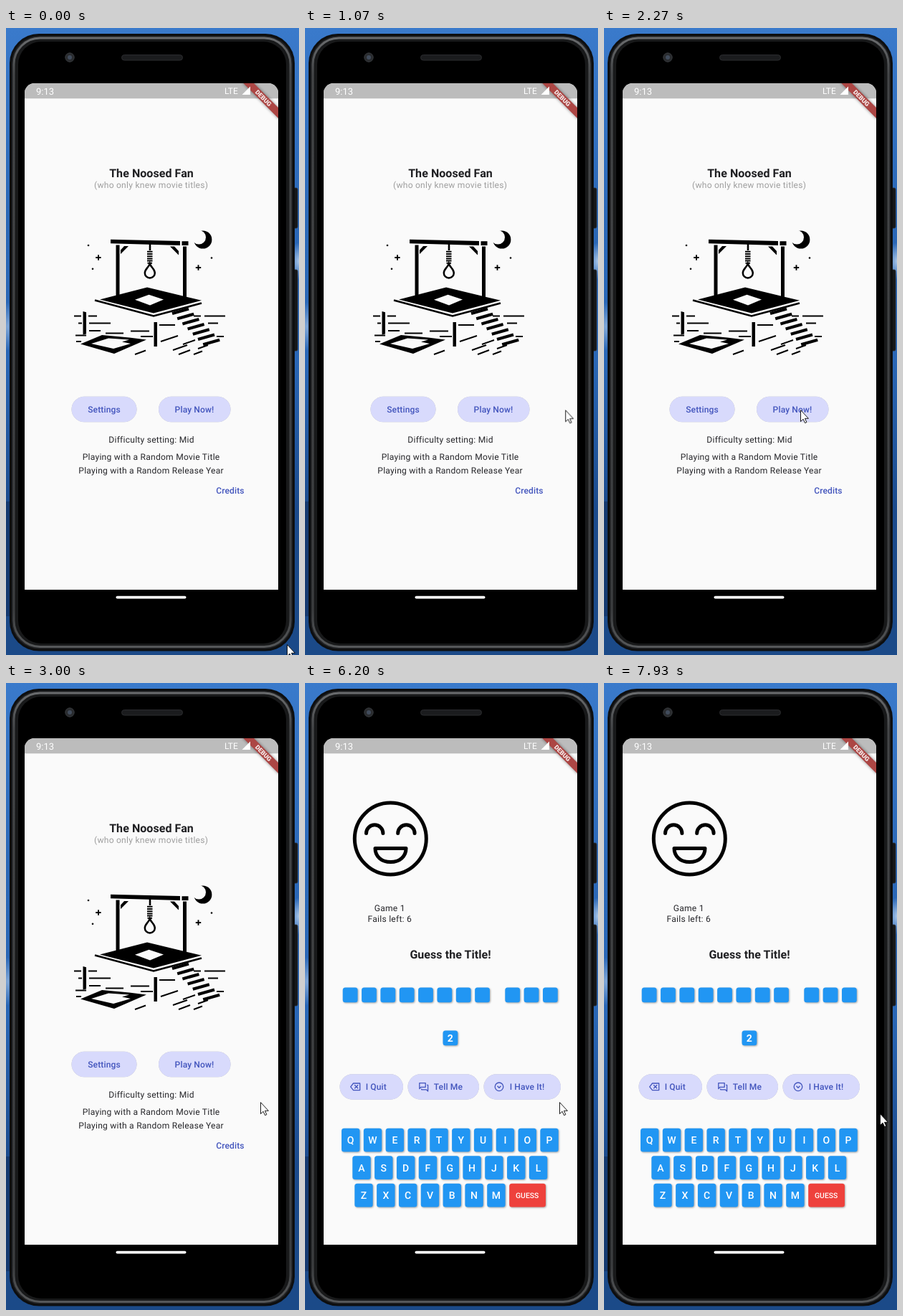
Animation, 409 px wide and 874 px high, one loop 8000 ms. Source, as an HTML page:

```html
<!DOCTYPE html>
<html lang="en">
<head>
<meta charset="utf-8">
<title>Word game</title>
<style>
html, body { margin: 0; width: 100%; height: 100%; overflow: hidden; background: #2763ae; }
svg { display: block; width: 409px; height: 874px; }
text { font: 400 12.06px Roboto, sans-serif; letter-spacing: .25px; fill: #26262a; text-rendering: geometricPrecision; }
.mid { text-anchor: middle; }
.head { font-size: 16px; font-weight: 700; letter-spacing: .06px; fill: #1f1f22; }
.sub { fill: #9e9e9e; }
.label { font-weight: 500; letter-spacing: .12px; fill: #4355bd; }
.white { fill: #fff; }
.pill { fill: #d8dafc; filter: drop-shadow(0 .8px .7px #0004); }
.icon { fill: none; stroke: #4355bd; stroke-width: 1.3; stroke-linejoin: round; }
.tile { fill: #2196f3; filter: drop-shadow(1px 1px .8px #0005); }
.guess { fill: #ee413c; }
.key { font-size: 14px; font-weight: 500; letter-spacing: 0; }
.ink { fill: none; stroke: #000; }

/* 15 steps per second, 120 steps per loop */
#home, #game, #face, #cursor { animation: 8s -5ms infinite step-end; }
#home { animation-name: home; }
#game { animation-name: game; }
#face { animation-name: face; }
#cursor { animation-name: move; }
@keyframes home { 0% { visibility: visible } 76.6667%, 100% { visibility: hidden } }
@keyframes game { 0% { visibility: hidden } 76.6667%, 100% { visibility: visible } }
@keyframes face { 0% { opacity: 0 } 77.5%, 100% { opacity: 1 } }
@keyframes move {
  0% { transform: translate(392px, 859px) }
  3.3333% { transform: translate(392px, 859px); animation-timing-function: steps(5) }
  7.5% { transform: translate(361px, 777px); animation-timing-function: steps(3) }
  10% { transform: translate(360px, 665px); animation-timing-function: steps(5) }
  14.1667% { transform: translate(364px, 499px); animation-timing-function: steps(3) }
  16.6667% { transform: translate(351px, 485px) }
  23.3333% { transform: translate(340px, 495px); animation-timing-function: steps(6) }
  28.3333% { transform: translate(274px, 532px) }
  35% { transform: translate(274px, 532px); animation-timing-function: steps(3) }
  37.5% { transform: translate(355px, 584px) }
  90% { transform: translate(357px, 591px); animation-timing-function: steps(2) }
  91.6667% { transform: translate(362px, 599px) }
  96.6667% { transform: translate(362px, 599px); animation-timing-function: steps(2) }
  98.3333% { transform: translate(377px, 597px) }
  99.1667%, 100% { transform: translate(385px, 600px) }
}
</style>
</head>
<body>
<svg viewBox="0 0 409 874">
  <defs>
    <linearGradient id="sky" x2="0" y2="1">
      <stop offset="0" stop-color="#3a7acb"/>
      <stop offset=".3" stop-color="#2b68b7"/>
      <stop offset=".53" stop-color="#2a67b6"/>
      <stop offset=".77" stop-color="#1b4a8c"/>
      <stop offset="1" stop-color="#1b4a88"/>
    </linearGradient>
    <radialGradient id="glow">
      <stop offset="0" stop-color="#a9c6e8"/>
      <stop offset="1" stop-color="#a9c6e8" stop-opacity="0"/>
    </radialGradient>
    <linearGradient id="rim" x2="0" y2="1">
      <stop offset="0" stop-color="#6a6c6e"/>
      <stop offset=".06" stop-color="#444648"/>
      <stop offset=".94" stop-color="#3c3e40"/>
      <stop offset="1" stop-color="#555759"/>
    </linearGradient>
    <clipPath id="glass"><path d="M26 783V91a14 14 0 0 1 14-14H366a14 14 0 0 1 14 14V783z"/></clipPath>
    <filter id="soft" x="-20%" y="-100%" width="140%" height="300%"><feGaussianBlur stdDeviation="2"/></filter>
    <mask id="crescent"><rect x="255" y="275" width="40" height="40" fill="#fff"/><circle cx="269.2" cy="291.8" r="9.8"/></mask>
  </defs>

  <!-- phone -->
  <rect width="409" height="874" fill="url(#sky)"/>
  <ellipse cx="2" cy="416" rx="12" ry="34" fill="url(#glow)" opacity=".7"/>
  <ellipse cx="409" cy="325" rx="14" ry="26" fill="url(#glow)"/>
  <rect y="660" width="7" height="160" fill="#153a70"/>
  <g fill="#161718" stroke="#2b2d2f" stroke-width=".8">
    <rect x="400" y="223" width="7" height="56" rx="2"/>
    <rect x="400" y="337" width="7" height="113" rx="2"/>
  </g>
  <rect x="5" y="8" width="398" height="860.5" rx="41" fill="#0d0e0f"/>
  <rect x="8" y="11" width="392" height="854.5" rx="38.5" fill="#202123"/>
  <rect x="11" y="14" width="386" height="848.5" rx="36.5" fill="#18191a" stroke="url(#rim)" stroke-width="3"/>
  <rect x="17" y="19" width="374" height="839" rx="32"/>
  <circle cx="89" cy="41" r="6.2" fill="#292b2e" stroke="#393c3f"/>
  <circle cx="89" cy="41" r="3" fill="#414c5c"/>
  <rect x="161.5" y="37.5" width="85" height="7.5" rx="3.7" fill="#1b1c1e" stroke="#2b2c2f"/>
  <rect x="153.5" y="791.7" width="98" height="3.8" rx="1.9" fill="#fff"/>

  <!-- screen -->
  <g clip-path="url(#glass)">
    <rect x="26" y="77" width="354" height="706" fill="#fafafa"/>
    <rect x="26" y="77" width="354" height="21.3" fill="#bcbcbc"/>
    <text class="white" x="42" y="92.5" style="font-size:13px;letter-spacing:0">9:13</text>
    <text class="white" x="305" y="91.5" style="font-size:12px;letter-spacing:0">LTE</text>
    <g transform="translate(380 77) rotate(45)">
      <rect x="-36" y="24.1" width="72" height="10.3" opacity=".45" filter="url(#soft)"/>
      <rect x="-36" y="24.1" width="72" height="10.3" fill="#ac4644"/>
      <text class="mid white" y="32.4" style="font-size:8.8px;font-weight:900;letter-spacing:0" opacity=".9">DEBUG</text>
    </g>
    <path d="M341 81.5V93H329.5z" fill="#fff"/>
  </g>

  <g id="home">
    <text class="mid head" x="203" y="208">The Noosed Fan</text>
    <text class="mid sub" x="202.6" y="223.3">(who only knew movie titles)</text>

    <!-- gallows -->
    <circle cx="274.8" cy="295" r="12.6" mask="url(#crescent)"/>
    <circle cx="115" cy="303" r="1.3"/><circle cx="287" cy="320.5" r="1.3"/><circle cx="121" cy="335.7" r="1.3"/>
    <path class="ink" stroke-width="1.9" d="M125.2 320h7.4M129 316.3v7.4M264.8 334h7.4M268.5 330.3v7.4"/>
    <path d="M146 294.8L243 297V303L146 300.3zM245.5 297.2h9v5.8h-9z"/>
    <path d="M153.5 302.5h5v75l-5-1.5zM247 304.5h5v75l-5-1.5z"/>
    <path d="M160 315V309.5L165 304H171zM229 304.5h6l6 6.5V316.5z"/>
    <path class="ink" stroke-width="2.6" d="M201 296v14"/>
    <path class="ink" stroke-width="2" d="M197 311.8h7.5M197 315h7.5M197 318.2h7.5M197 321.4h7.5M197 324.6h7.5M197.5 327.8h6.5"/>
    <path class="ink" stroke-width="2.5" d="M200.7 328.5C199 334 193.8 336 193.8 341.5a7 7 0 0 0 14 0C207.8 336 202.5 334 200.7 328.5z"/>
    <path d="M131 378.5L197 361.5L273 379.8L206 397.5z"/>
    <path d="M180 378.8L199.5 371.8L220 378.5L201 386.5z" fill="#fafafa"/>
    <path class="ink" stroke-width="2.6" d="M124 379.5L206 401.5L273 383.5"/>
    <path d="M107.5 395l4.5 1.3V426.5l-4.5 1zM206.5 410h4.500v34h-4.500z"/>
    <path d="M104 440.5L134 428L172 431.500L196 434.5L151 454z"/>
    <path d="M119 440L143 432.5L172 434.5L162 437.5L174 440L150 447z" fill="#fafafa"/>
    <path id="stairs" class="ink" stroke-width="4.2"/>
    <path class="ink" stroke-width="1.9" d="M95 401.5h10M115 401.5h12M262 401.5h10M277 401.5h29M101 411.5h5M116 411.5h30M282 411.5h14M116 422h16M139 425.5h25M174 422.5h26M97 428.5h15M98 437h7M188 430h17M214 414h22M216 437l24-8M247 441l17-6M233 449l20-7M241 455l16-6M268 447l14-5M262 455l12-4.5M180 455l15-5.5M294 430h10"/>

    <rect class="pill" x="91.5" y="513.8" width="91" height="35.5" rx="17.75"/>
    <rect class="pill" x="213" y="513.8" width="100.5" height="35.5" rx="17.75"/>
    <text class="mid label" x="137" y="535.8">Settings</text>
    <text class="mid label" x="263" y="535.8">Play Now!</text>
    <text class="mid" x="203" y="578">Difficulty setting: Mid</text>
    <text class="mid" x="202.6" y="601.7">Playing with a Random Movie Title</text>
    <text class="mid" x="202.6" y="620.7">Playing with a Random Release Year</text>
    <text class="mid label" x="313" y="649.3">Credits</text>
  </g>

  <g id="game">
    <g id="face" class="ink" stroke-width="5" stroke-linecap="round" stroke-linejoin="round">
      <circle cx="119.3" cy="217" r="50"/>
      <path d="M85.5 209.5a11.7 11.7 0 0 1 23.4 0M129.7 209.5a11.7 11.7 0 0 1 23.4 0"/>
      <path d="M98 230.5H141C141 242 132 249.5 119.5 249.5S98 242 98 230.5z"/>
    </g>
    <text class="mid" x="118.3" y="318.3">Game 1</text>
    <text class="mid" x="118.3" y="332.6">Fails left: 6</text>
    <text class="mid head" x="203" y="384">Guess the Title!</text>
    <g id="tiles"></g>

    <rect class="pill" x="48.5" y="545.2" width="88.5" height="35.5" rx="17.75"/>
    <rect class="pill" x="143.5" y="545.2" width="99.5" height="35.5" rx="17.75"/>
    <rect class="pill" x="249.5" y="545.2" width="107.5" height="35.5" rx="17.75"/>
    <g class="icon">
      <path d="M67.5 558H76.7V567.6H67.5L63.7 562.8zM69.2 560.3l5 5M74.2 560.3l-5 5"/>
      <path d="M159.8 557.6H168.2V563.3H162L159.8 565.5zM170.2 560.3H171.6V569L169.3 566.8H162.7V565.5"/>
      <circle cx="271" cy="562.8" r="5.8"/>
      <path d="M268.5 561.8l2.5 2.5l2.5-2.5"/>
    </g>
    <text class="label" x="84.7" y="567.2">I Quit</text>
    <text class="label" x="179.7" y="567.2">Tell Me</text>
    <text class="label" x="285.7" y="567.2">I Have It!</text>
    <g id="keys"></g>
  </g>

  <path id="cursor" d="M.5 .6V16.6L4.1 13.2L6.6 18.6L8.9 17.6L6.5 12.3H11.4z" fill="#fff" stroke="#000" stroke-width=".9"/>
</svg>
<script>
const $ = id => document.getElementById(id);

const box = (x, y, w, h, kind = '') =>
  `<rect class="tile ${kind}" x="${x}" y="${y}" width="${w}" height="${h}" rx="3.5"/>`;
const square = (x, y) => box(x, y, 20.8, 20.8);
const letter = (x, y, s, style = '') =>
  `<text class="mid key white" x="${x}" y="${y}" style="${style}">${s}</text>`;

// Treads, each lower and further right
$('stairs').setAttribute('d', Array.from({ length: 7 }, (_, i) =>
  `M${232 + i * 7.2} ${398 + i * 7.2}l23-6.5`).join(''));

let tiles = '';
for (let i = 0; i < 8; i++) tiles += square(52.7 + i * 26.35, 424.5);
for (let i = 0; i < 3; i++) tiles += square(279.3 + i * 26.35, 424.5);
$('tiles').innerHTML = tiles + square(192.5, 484.5) +
  letter(202.8, 499.8, 2, 'font-weight:700');

const rows = [['QWERTYUIOP', 63.7], ['ASDFGHJKL', 79], ['ZXCVBNM', 82]];
$('keys').innerHTML = rows.map(([chars, left], r) =>
  [...chars].map((c, i) => {
    const x = left + i * 30.82, y = 620.8 + r * 38.5;
    return box(x - 12.7, y, 25.4, 32.8) + letter(x, y + 21.4, c);
  }).join('')).join('') +
  box(285.2, 697.8, 50.8, 32.8, 'guess') +
  letter(310.2, 717.9, 'GUESS', 'font-size:10.4px');
</script>
</body>
</html>
```
